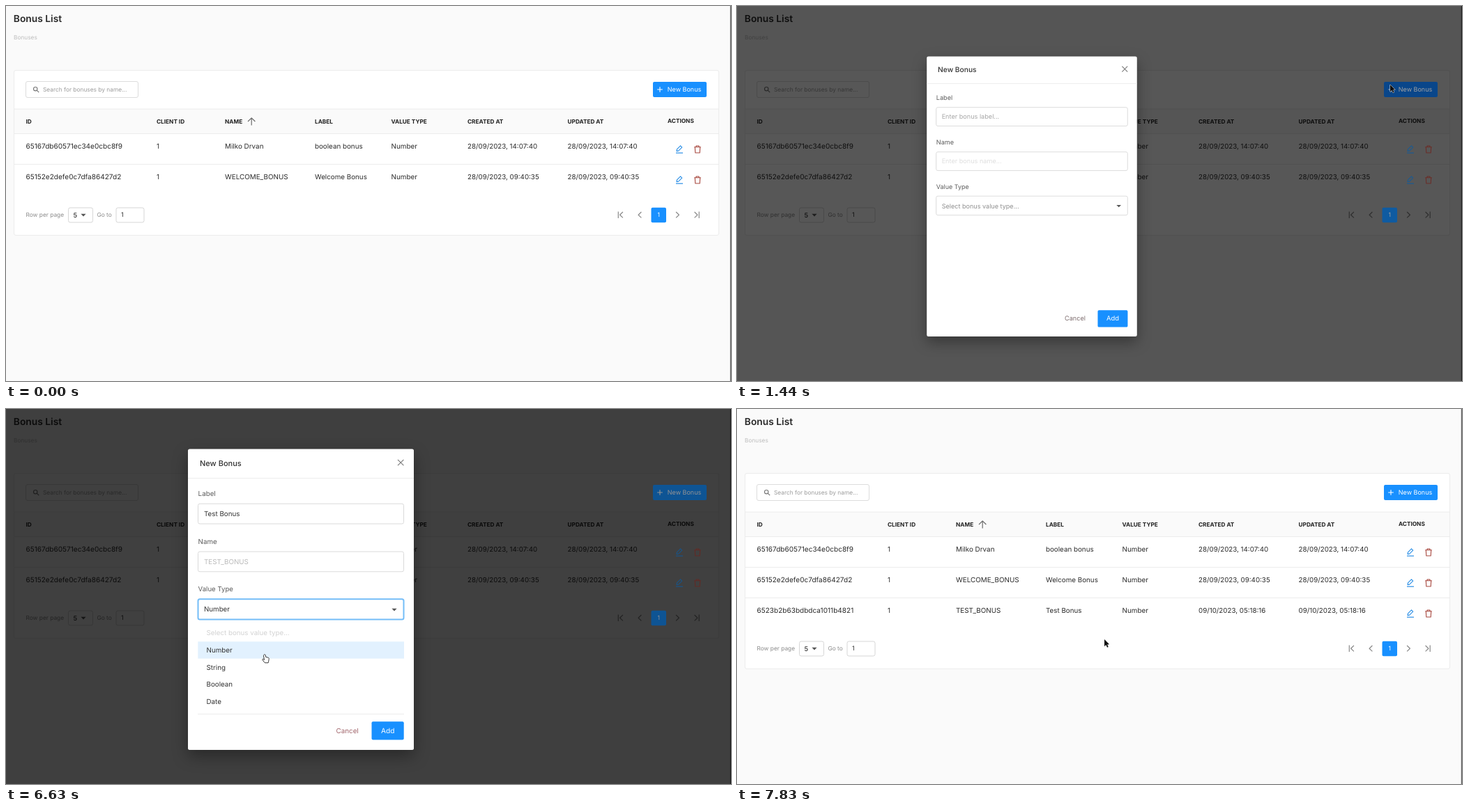
Animation of 1040x539 px, one loop 8000 ms. Source, as an HTML page:

```html
<!DOCTYPE html>
<html lang="en">
<head>
<meta charset="utf-8">
<title>Bonus List</title>
<style>
  html, body { margin: 0; width: 100%; height: 100%; overflow: hidden; background: #fafafa; }
  svg { display: block; width: 100vw; height: 100vh; }
  text { font-family: Inter, Roboto, sans-serif; text-rendering: geometricPrecision; white-space: pre; }
  #modal { filter: drop-shadow(0 9px 11px rgba(0, 0, 0, .35)); }
</style>
</head>
<body>
<svg id="stage" viewBox="0 0 1040 539" preserveAspectRatio="none"></svg>
<script>
const LOOP = 8000;
const BLUE = '#1890ff', BLUE_DARK = '#0f6fdb';
const stage = document.getElementById('stage');

const text = (x, y, s, size, fill, weight = 400, extra = '') =>
  `<text x="${x}" y="${y}" font-size="${size}" font-weight="${weight}" fill="${fill}" ${extra}>${s}</text>`;
const box = (x, y, w, h, fill, stroke = 'none', r = 0, extra = '') =>
  `<rect x="${x}" y="${y}" width="${w}" height="${h}" rx="${r}" fill="${fill}" stroke="${stroke}" ${extra}/>`;
const path = (d, stroke, width = 1, fill = 'none', extra = '') =>
  `<path d="${d}" stroke="${stroke}" stroke-width="${width}" fill="${fill}" stroke-linejoin="round" ${extra}/>`;
const line = (y, x1, x2, stroke = '#ececec') => path(`M${x1} ${y}H${x2}`, stroke);
const caretDown = (x, y, fill = '#555') => path(`M${x - 3.6} ${y - 1.7}h7.2l-3.6 3.6z`, 'none', 0, fill);

// ---- page ----
const COLS = [28.5, 216, 314, 443, 552.5, 662, 805.5];
const SIZES = [10.05, 9.9, 9.9, 9.8, 9.9, 9.75, 9.75];
const HEADS = ['ID', 'CLIENT ID', 'NAME', 'LABEL', 'VALUE TYPE', 'CREATED AT', 'UPDATED AT'];
const ROWS = [
  ['65167db60571ec34e0cbc8f9', '1', 'Milko Drvan', 'boolean bonus', 'Number', '28/09/2023, 14:07:40'],
  ['65152e2defe0c7dfa86427d2', '1', 'WELCOME_BONUS', 'Welcome Bonus', 'Number', '28/09/2023, 09:40:35'],
  ['6523b2b63bdbdca1011b4821', '1', 'TEST_BONUS', 'Test Bonus', 'Number', '09/10/2023, 05:18:16']
];
const ROW_H = 44;

const rowText = (row, i) => [...row, row[5]]
  .map((s, c) => text(COLS[c], 205.2 + i * ROW_H, s, SIZES[c], '#2b2b2b')).join('');

const rowIcons = i => {
  const y = 206 + i * ROW_H;
  return path(`M962 ${y + 2.6}l.5-2.7 5-5 2.2 2.2-5 5z`, '#2b8fe6', 1.1) +
    path(`M961 ${y + 5.2}h10`, '#2b8fe6', 1.2) +
    path(`M987.2 ${y - 3.3}h9.6M990 ${y - 3.5}v-1.5h4v1.5M988.3 ${y - 3}l.5 8h6.4l.5-8`, '#a8483f', 1.1);
};

const searchIcon = '<circle cx="42.2" cy="119.2" r="2.7" fill="none" stroke="#777" stroke-width="1.1"/>' +
  path('M44.2 121.2l3 3', '#777', 1.2);

const pager = (cx, flip, bar) => {
  const d = flip * 2.4;
  return path(`M${cx - d} 296l${d * 1.8} 4.2l${-d * 1.8} 4.2`, '#8a8a8a', 1.2) +
    (bar ? path(`M${cx + flip * 4.2} 295.6v9.4`, '#8a8a8a', 1.2) : '');
};

const footer = text(28.5, 303.4, 'Row per page', 8.35, '#8c8c8c') +
  box(89.5, 290, 35, 21, '#fff', '#d6d6d6', 2.5) + text(96.5, 303.7, '5', 9.3, '#333', 500) + caretDown(111, 300.5) +
  text(130.5, 303.4, 'Go to', 8.35, '#8c8c8c') +
  box(158, 290, 40, 21, '#fff', '#d6d6d6', 2.5) + text(165, 303.4, '1', 9, '#333') +
  pager(882.5, -1, true) + pager(909, -1) + pager(963.5, 1) + pager(990, 1, true);

const page = box(0, 0, 1040, 539, '#fafafa') +
  text(10.8, 23.4, 'Bonus List', 13.8, '#2a2a2a', 600) +
  text(11, 47.6, 'Bonuses', 8.3, '#bdbdbd') +
  `<rect id="card" x="11.5" y="92.5" width="1011" height="237" rx="2.5" fill="#fff" stroke="#ececec"/>` +
  box(28.5, 108.5, 161, 23, '#fff', '#dcdcdc', 2.5) + searchIcon +
  text(53, 123.2, 'Search for bonuses by name...', 8.35, '#9c9c9c') +
  box(12, 148, 1010, 35.5, '#fafafa') + line(148, 12, 1022) + line(183.5, 12, 1022) +
  HEADS.map((s, i) => text(COLS[i], 168.8, s, 8.25, '#222', 700)).join('') +
  text(949, 168.4, 'ACTIONS', 8.25, '#222', 700) +
  path('M352.2 171.5v-10.6M347 166l5.2-5.2 5.2 5.2', '#6c6c6c', 1.2) +
  rowText(ROWS[0], 0) + line(227.5, 12, 1022) + rowText(ROWS[1], 1) +
  `<g id="newRow">${line(271.5, 12, 1022)}${rowText(ROWS[2], 2)}</g>` +
  `<g class="foot">${footer}</g>` +
  box(1038.8, 0, 1.2, 539, '#5c5c5c');

// coloured controls stay more saturated under the scrim
const controls = `<g id="controls">` +
  `<rect id="newBtn" x="928" y="109" width="77" height="22" rx="2"/>` +
  path('M934.2 120h7.6M938 116.2v7.6', '#fff', 1.1) +
  text(948.8, 123.3, 'New Bonus', 9, '#fff') +
  rowIcons(0) + rowIcons(1) + `<g id="newIcons">${rowIcons(2)}</g>` +
  `<g class="foot">${box(925.5, 289.7, 21.5, 21.5, BLUE, 'none', 2)}${text(936.2, 303.4, '1', 8.6, '#fff', 400, 'text-anchor="middle"')}</g></g>`;

// ---- dialog ----
const OPTIONS = ['Number', 'String', 'Boolean', 'Date'];
const field = (id, y, h) => `<rect id="${id}" x="275.5" y="${y}" width="295" height="${h}" rx="2.5" fill="#fff"/>`;
const slot = (id, x, y, size = 9.8) => `<text id="${id}" x="${x}" y="${y}" font-size="${size}"></text>`;

const list = `<g id="list">` + box(275, 309, 296, 129, '#fff') +
  text(287.5, 325.4, 'Select bonus value type...', 9.75, '#d2d2d2') +
  box(275.3, 334.3, 295.7, 24.4, '#e2f1fe') +
  OPTIONS.map((s, i) => text(287.5, 350 + i * 24.5, s, 9.8, '#333')).join('') +
  line(438.5, 275, 571) + `</g>`;

const modal = `<g id="modal">` + box(261, 57.5, 324, 432.5, '#fff', 'none', 2.5) +
  text(278, 82, 'New Bonus', 11, '#333', 500) +
  path('M562 72.8l8.4 8.4M570.4 72.8l-8.4 8.4', '#777', 1.1) +
  line(99.5, 261, 585) +
  text(275.6, 125, 'Label', 9.8, '#5c5c5c') +
  text(275.6, 193.5, 'Name', 9.8, '#5c5c5c') +
  text(275.6, 262.2, 'Value Type', 9.6, '#5c5c5c') +
  field('labelBox', 136.2, 28.8) + slot('label', 284, 153.9) +
  `<rect id="caret" y="144.5" width="1" height="12.5" fill="#222"/>` +
  field('nameBox', 205, 28.8) + slot('name', 284, 222.7) +
  field('typeBox', 273.2, 29.4) + slot('type', 284, 291.8, 9.75) + caretDown(557, 288.5) +
  list +
  `<text id="cancel" x="473.6" y="465.6" font-size="9.8">Cancel</text>` +
  `<rect id="addBtn" x="524.5" y="449.3" width="46.2" height="26.2" rx="2"/>` +
  `<text id="addText" x="538" y="465.6" font-size="10.1" fill="#fff">Add</text></g>`;

// ---- pointer ----
const pointers = {
  arrow: path('M0 0v10.2l2.3-2.1 1.7 3.6 1.7-.8-1.6-3.5 3-.2z', '#fff', 0.9, '#111', 'paint-order="stroke"'),
  hand: path('M-.6 0c1-.6 1.6.1 1.8 1l.6 2.6 3 .6c1.2.3 1.5 1 1.4 2.2l-.5 3-.6 2.4h-4.8l-3.4-4.2c-.6-1 .5-1.6 1.4-.9l1.2 1-1-6c-.1-.8.3-1.4.9-1.7z', '#222', 0.9, '#fff'),
  ibeam: path('M-2-4.5q2 0 2 1.2q0-1.2 2-1.2M0-3.3v6.6M-2 4.5q2 0 2-1.2q0 1.2 2 1.2M-1 .9h2', '#555', 0.9)
};
const pointerLayer = Object.entries(pointers)
  .map(([k, s]) => `<g id="${k}">${s}</g>`).join('');

stage.innerHTML = page + `<rect id="scrim" width="1040" height="539"/>` + controls + modal + pointerLayer;

const $ = id => document.getElementById(id);
const feet = [...document.querySelectorAll('.foot')];
const show = (id, on) => $(id).setAttribute('display', on ? 'inline' : 'none');
const set = (id, attrs) => { for (const k in attrs) $(id).setAttribute(k, attrs[k]); };
const write = (id, s, fill) => { $(id).textContent = s; $(id).setAttribute('fill', fill); };
const smooth = (t, a, b) => {
  const p = Math.min(1, Math.max(0, (t - a) / (b - a)));
  return p * p * (3 - 2 * p);
};

// time, x, y of the pointer tip
const TRACK = [
  [180, 36, 550], [1000, 942, 111], [1360, 942, 111], [1440, 937, 113], [2080, 479, 144],
  [5000, 479, 144], [5500, 402, 287], [5570, 402, 287], [5830, 383, 316], [6110, 372, 340],
  [6250, 372, 340], [6430, 371, 353], [6670, 371, 353], [7400, 546, 461], [7470, 546, 461],
  [7670, 534, 360], [7830, 527, 331]
];
const SHAPES = [[0, 'arrow'], [940, 'hand'], [1400, 'arrow'], [1960, 'ibeam'], [5160, 'arrow'],
  [5420, 'hand'], [6760, 'arrow'], [7260, 'hand'], [7510, 'arrow']];
const KEYS = [2410, 2490, 2690, 2770, 3060, 3350, 3850, 4050, 4130, 4250];
const PHRASE = 'Test Bonus';

function pointerAt(t) {
  const i = TRACK.findIndex(k => k[0] > t);
  if (i < 0) return TRACK[TRACK.length - 1].slice(1);
  if (i === 0) return TRACK[0].slice(1);
  const [a, x, y] = TRACK[i - 1], [b, u, v] = TRACK[i];
  const p = smooth(t, a, b);
  return [x + (u - x) * p, y + (v - y) * p];
}

function focus(id, on) {
  set(id, { stroke: on ? '#74bdf8' : '#dadada', 'stroke-width': on ? 2 : 1 });
}

function draw(t) {
  const closing = 1 - smooth(t, 7623, 7766);
  const scale = smooth(t, 1321, 1464) * closing;
  const dim = smooth(t, 1321, 1474) * closing;
  const added = t >= 7590, sent = t >= 7470;

  show('newRow', added);
  show('newIcons', added);
  $('card').setAttribute('height', added ? 281 : 237);
  feet.forEach(g => g.setAttribute('transform', `translate(0 ${added ? ROW_H : 0})`));
  set('newBtn', { fill: t >= 1040 && t < 1560 ? BLUE_DARK : BLUE });
  set('scrim', { opacity: 0.75 * dim });
  $('controls').style.filter = dim ? `brightness(${1 - 0.42 * dim})` : 'none';

  show('modal', scale > 0.002);
  set('modal', { transform: `translate(423 273.7) scale(${scale}) translate(-423 -273.7)` });

  const typed = added ? '' : PHRASE.slice(0, KEYS.filter(k => k <= t).length);
  const labelFocus = t >= 2040 && t < 5500;
  write('label', typed || 'Enter bonus label...', typed ? '#333' : '#a6a6a6');
  write('name', typed ? typed.toUpperCase().replace(' ', '_') : 'Enter bonus name...', typed ? '#bababa' : '#dedede');
  focus('labelBox', labelFocus);
  focus('nameBox', false);
  show('caret', labelFocus && t < 4790);
  if (labelFocus) {
    const n = typed.length;
    set('caret', { x: n ? 284.3 + $('label').getSubStringLength(0, n) : 284 });
  }

  const chosen = t >= 6630 && !added;
  write('type', chosen ? 'Number' : 'Select bonus value type...', chosen ? '#333' : '#8f8f8f');
  set('type', { y: t >= 5500 && !sent ? 291.2 : 292 });
  focus('typeBox', t >= 5500 && !sent);
  show('list', t >= 5580 && t < 6710);

  set('cancel', { fill: sent || scale < 1 ? '#7d6c6d' : '#a2666c' });
  set('addBtn', { fill: sent ? '#c6def5' : t >= 7280 ? BLUE_DARK : BLUE });
  show('addText', !sent);

  const shape = SHAPES.filter(s => s[0] <= t).pop()[1];
  const [x, y] = pointerAt(t);
  for (const k in pointers) show(k, k === shape && t >= 200);
  set(shape, { transform: `translate(${x} ${y})` });
}

const start = performance.now();
function tick() {
  draw((performance.now() - start) % LOOP);
  requestAnimationFrame(tick);
}
tick();
</script>
</body>
</html>
```
